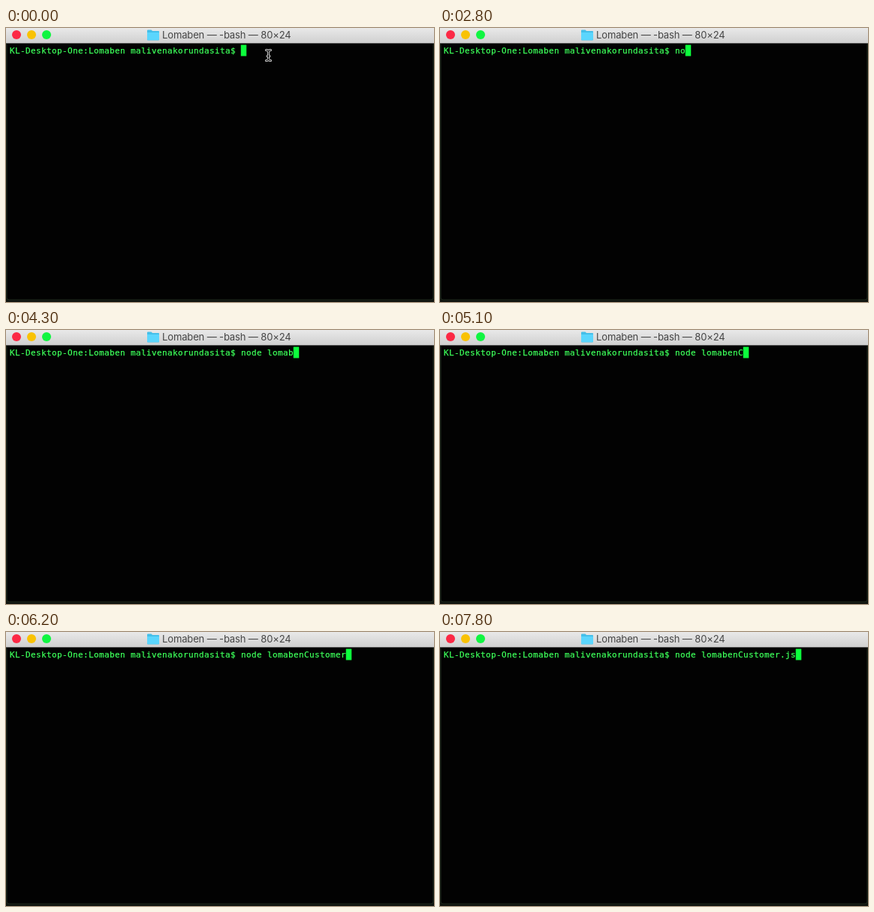
An HTML page that plays this animation: 570 px wide and 366 px high, repeating every 8000 ms.

```html
<!DOCTYPE html>
<html lang="en">
<head>
<meta charset="utf-8">
<title>Terminal</title>
<style>
  html, body { margin: 0; width: 100%; height: 100%; overflow: hidden; background: #000; }
  svg { display: block; width: 570px; height: 366px; }
  .title { font: 13px Inter, sans-serif; letter-spacing: -.13px; fill: #454545; }
  .line {
    font: 11px "DejaVu Sans Mono", monospace;
    letter-spacing: calc(7px - 1ch);
    white-space: pre;
    fill: #3dff5a;
    stroke: #3dff5a;
    stroke-width: .25px;
  }
</style>
</head>
<body>
<svg viewBox="0 0 570 366">
  <defs>
    <linearGradient id="bar" x2="0" y2="1">
      <stop stop-color="#e9e9e9"/>
      <stop offset="1" stop-color="#d0d0d0"/>
    </linearGradient>
    <path id="beam" d="M346.500 29.500q3 0 3 2.500q0-2.500 3-2.500M349.500 32v9M346.500 43.500q3 0 3-2.500q0 2.500 3 2.500M348 37.500h3"/>
  </defs>

  <rect width="570" height="366" fill="#10140f"/>
  <path d="M1 20H569V360Q569 363 566 363H4Q1 363 1 360Z" fill="#020202" stroke="#1d281c"/>

  <rect width="570" height="20" fill="url(#bar)"/>
  <rect y="20" width="570" height="1" fill="#555"/>
  <circle cx="14" cy="9" r="6" fill="#fc2945"/>
  <circle cx="34" cy="9" r="6" fill="#f9c204"/>
  <circle cx="54" cy="9" r="6" fill="#10f541"/>
  <path d="M188 3.500q0-1 1-1h4.500l1.500 1.500h8q1 0 1 1v10.500q0 1-1 1h-14q-1 0-1-1z" fill="#45bfe9"/>
  <path d="M188 6h16v9q0 1-1 1h-14q-1 0-1-1z" fill="#5bd6fd"/>
  <text class="title" x="208" y="14">Lomaben — -bash — 80×24</text>

  <text class="line" id="line" x="5" y="34"></text>
  <rect id="caret" y="22.500" width="7.500" height="15" fill="#0cff3c"/>

  <g id="pointer" fill="none" stroke-linecap="round">
    <use href="#beam" stroke="#d8d8d8" stroke-width="3"/>
    <use href="#beam" stroke="#0a0a0a" stroke-width="1.100"/>
  </g>
</svg>
<script>
  const LOOP = 8000, TICK = 100, BLINK = 500;
  const LEFT = 4.75, CELL = 7;
  const TYPING = 2500, HIDE_POINTER = 2800;
  const PROMPT = 'KL-Desktop-One:Lomaben malivenakorundasita$ ';
  const COMMAND = 'node lomabenCustomer.js';

  // Typing pace: how far the command has got at each time
  const PACE = [
    [0, ''], [TYPING, 'n'], [3400, 'node '], [4600, 'node lomaben'],
    [5600, 'node lomabenCus'], [6200, 'node lomabenCustomer'],
    [7200, 'node lomabenCustomer.'], [7800, COMMAND]
  ].map(([time, text]) => [time, text.length]);

  const [line, caret, pointer] =
    ['line', 'caret', 'pointer'].map(id => document.getElementById(id));

  // Keys land at an even rate between two points of the pace
  function typedAt(t) {
    const next = PACE.findIndex(([time]) => time > t);
    if (next < 0) return COMMAND.length;
    const [t0, n0] = PACE[next - 1], [t1, n1] = PACE[next];
    return n0 + Math.floor((n1 - n0) * (t - t0) / (t1 - t0));
  }

  const caretOn = t =>
    t >= TYPING || t < TICK || Math.floor((t - TICK) / BLINK) % 2 === 0;

  const show = (el, on) => el.setAttribute('visibility', on ? 'visible' : 'hidden');

  function render(t) {
    const text = PROMPT + COMMAND.slice(0, typedAt(t));
    if (line.textContent !== text) line.textContent = text;
    caret.setAttribute('x', LEFT + CELL * text.length);
    show(caret, caretOn(t));
    show(pointer, t < HIDE_POINTER);
  }

  const begin = performance.now();
  function tick() {
    const t = (performance.now() - begin) % LOOP;
    render(Math.floor(t / TICK) * TICK);
    requestAnimationFrame(tick);
  }
  tick();
</script>
</body>
</html>
```
